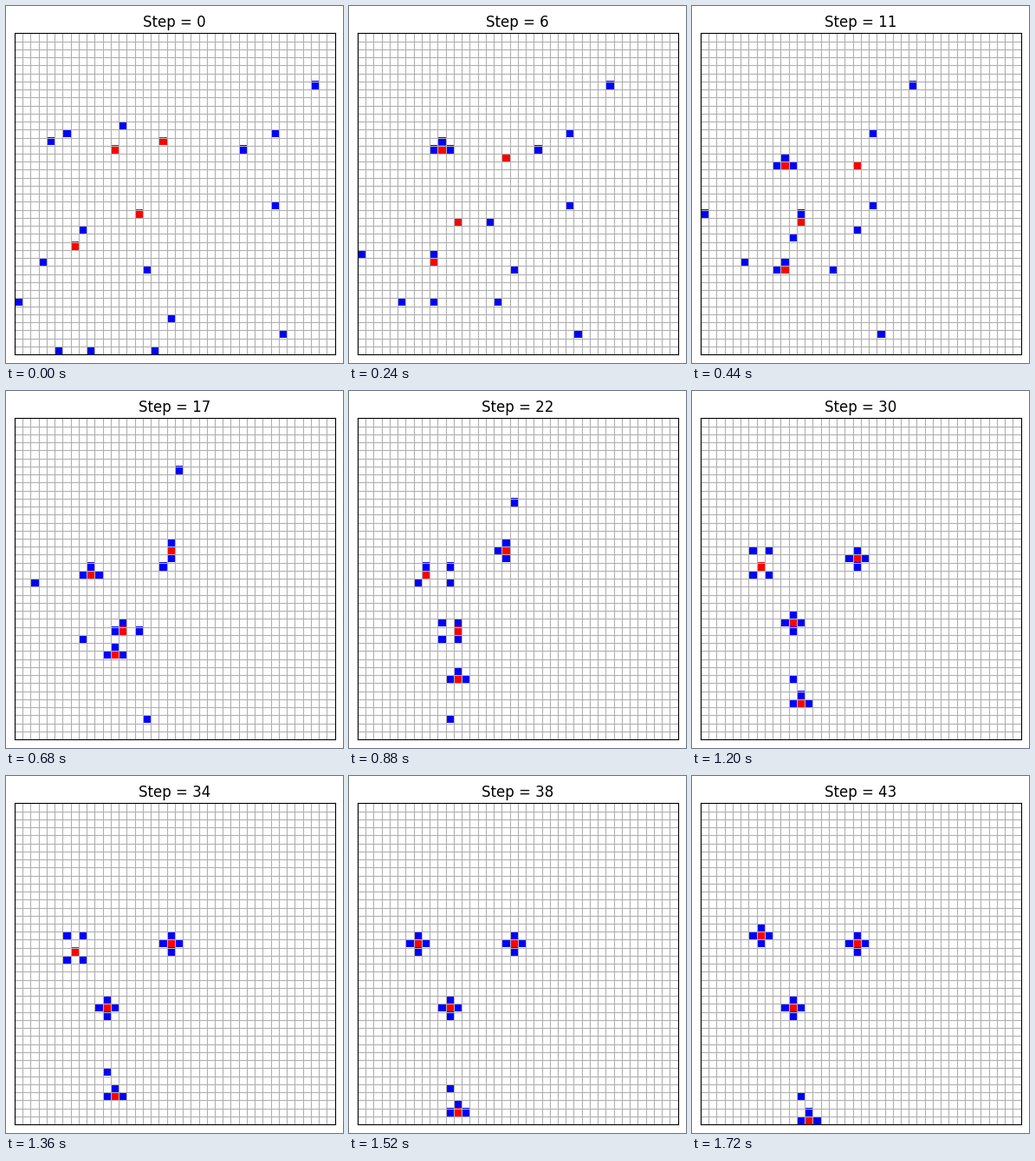
A matplotlib script that plays this animation: 389 px wide and 411 px high, repeating every 1760 ms.

```python
import numpy as np
import matplotlib.pyplot as plt
from matplotlib.animation import FuncAnimation

W, H, DPI = 389, 411, 100
N, STEPS, TICK = 40, 44, 40
SIDE, MARGIN = 369.6, 10
KEYS = (0, 6, 11, 17, 26, 34, 43)
RED, BLUE = (255, 0, 0), (0, 0, 255)
NORTH, EAST, SOUTH, WEST = (0, -1), (1, 0), (0, 1), (-1, 0)
TRAIL = (-1, -3)
CROSS = (NORTH, EAST, SOUTH, WEST)


def box(left, right, top, bottom):
    """Four corners around the prey, clockwise from the upper right."""
    return (right, top), (right, bottom), (left, bottom), (left, top)


def flee(points):
    """Prey path through its key cells, moves spread evenly; the last is held."""
    path = []
    for t0, t1, a, b in zip(KEYS, KEYS[1:], points, points[1:]):
        pos, cells = np.array(a), [a]
        while tuple(pos) != b:
            gap = np.array(b) - pos
            axis = int(abs(gap[1]) > abs(gap[0]))
            pos[axis] += np.sign(gap[axis])
            cells.append(tuple(pos))
        moves, steps = len(cells) - 1, t1 - t0
        path += [cells[(2 * k * moves + steps) // (2 * steps)]
                 for k in range(steps)]
    return path + [points[-1]] * (STEPS - len(path))


def chase(start, goals):
    """One cell per step: close the longer gap first, then the other one."""
    pos, path = np.array(start), [start]
    lead = int(np.argmax(np.abs(np.array(goals[0]) - pos)))
    for goal in goals[1:]:
        gap = np.array(goal) - pos
        axis = lead if gap[lead] else 1 - lead
        pos[axis] += np.sign(gap[axis])
        path.append(tuple(pos))
    return path


def hunt(points, starts, phases):
    """Paths of one prey and its pack; phases are (last step, formation)."""
    prey = flee(points)
    pack = []
    for i, start in enumerate(starts):
        goals = []
        for step, (x, y) in enumerate(prey):
            dx, dy = next(form[i] for last, form in phases if step <= last)
            goals.append((x + dx, y + dy))
        pack.append(chase(start, goals))
    return prey, pack


hunts = [
    hunt([(12, 14), (10, 14), (10, 16), (9, 19), (8, 18), (7, 18), (7, 16)],
         [(6, 12), (13, 11), (0, 33), (4, 13)],
         [(17, CROSS), (26, box(0, 3, -1, 1)), (34, box(-1, 1, -2, 1)),
          (STEPS, CROSS)]),
    hunt([(18, 13), (18, 15), (19, 16), (19, 16), (18, 17), (19, 17)],
         [(32, 12), (37, 6), (28, 14), (32, 21)],
         [(STEPS, CROSS)]),
    hunt([(15, 22), (12, 23), (12, 23), (13, 26), (12, 25), (11, 25)],
         [(16, 29), (19, 35), (5, 39), (3, 28)],
         [(17, CROSS), (26, box(-2, 0, -1, 1)), (STEPS, CROSS)]),
    hunt([(7, 26), (9, 28), (10, 29), (12, 29), (13, 34), (12, 36), (13, 39)],
         [(8, 24), (17, 39), (33, 37), (9, 39)],
         [(STEPS, (NORTH, EAST, TRAIL, WEST))]),
]


def board(step):
    cells = np.full((N, N, 3), 255, np.uint8)
    for _, pack in hunts:
        for path in pack:
            x, y = path[step]
            cells[y, x] = BLUE
    for prey, _ in hunts:
        x, y = prey[step]
        cells[y, x] = RED
    return cells


fig = plt.figure(figsize=(W / DPI, H / DPI), dpi=DPI, facecolor="white")
ax = fig.add_axes([MARGIN / W, MARGIN / H, SIDE / W, SIDE / H])
image = ax.imshow(board(0), interpolation="nearest", aspect="auto",
                  extent=(0, N, N, 0))
ax.set_xticks(range(1, N))
ax.set_yticks(range(1, N))
ax.tick_params(length=0, labelbottom=False, labelleft=False)
ax.grid(color="#b0b0b0", linewidth=0.8)
title = fig.text((MARGIN + SIDE / 2) / W, 1 - 24 / H, "Step = 0", ha="center",
                 va="baseline", family="DejaVu Sans", fontsize=12)


def update(step):
    image.set_data(board(step))
    title.set_text(f"Step = {step}")
    return image, title


anim = FuncAnimation(fig, update, frames=STEPS, interval=TICK,
                     repeat=True, repeat_delay=0, blit=False)
plt.show()
```
